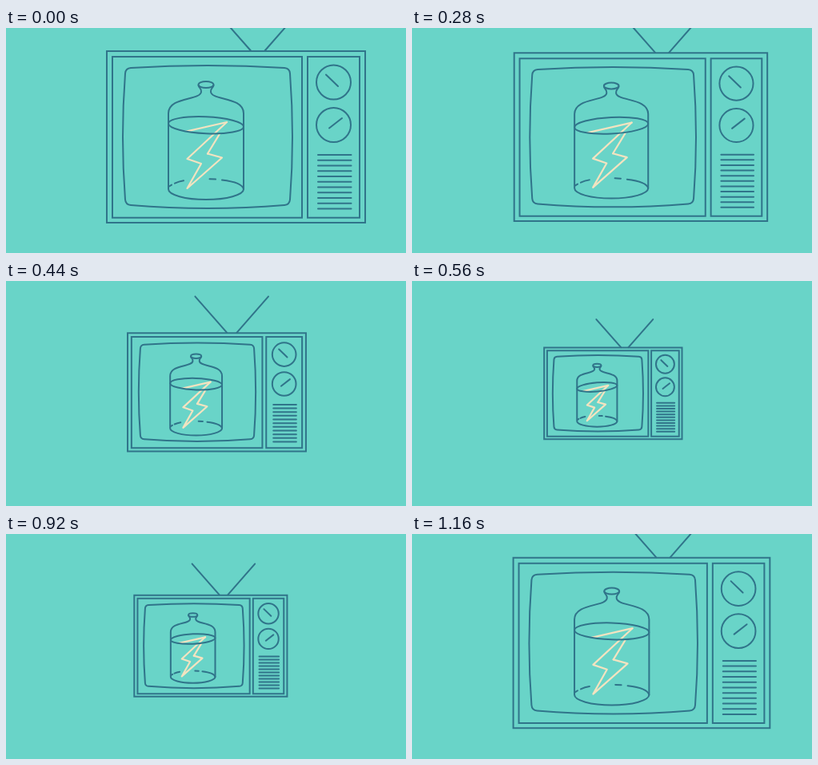
Write an HTML page that moves like this. It is 500 px wide and 282 px high and loops after 1200 ms.

```html
<!DOCTYPE html>
<html lang="en">
<head>
<meta charset="utf-8">
<title>Bottled lightning</title>
<style>
  html, body { margin: 0; width: 100%; height: 100%; overflow: hidden; background: #69d4c8; }
  svg { display: block; width: 100%; height: 100%; }
  #scene * { vector-effect: non-scaling-stroke; }
  #scene { fill: none; stroke: #30748a; stroke-width: 2; stroke-linecap: round; }
  .bolt { stroke: #f3e3c0; stroke-width: 2.2; stroke-linejoin: round; }
</style>
</head>
<body>
<svg viewBox="0 0 500 282">
  <defs>
    <clipPath id="surface"><ellipse class="slosh" cx="250" cy="121.7" rx="47" ry="10.5"/></clipPath>
    <clipPath id="water"><path class="slosh" d="M203 121.7A47 10.5 0 0 0 297 121.7V240H203Z"/></clipPath>
  </defs>
  <g id="scene">
    <!-- cabinet and aerial -->
    <path d="M248.2 -37.3L306 28.5M381 -37.3L323.5 28.5"/>
    <rect x="126" y="29" width="323" height="215"/>
    <rect x="133" y="36" width="237" height="201.7"/>
    <rect x="377" y="36" width="65" height="201.7"/>
    <path d="M156 50Q252 44 348 50Q354.500 50.500 355 57Q361 137 355 215Q354.500 221.500 348 222Q252 230 156 222Q149.500 221.500 149 215Q143 137 149 57Q149.500 50.500 156 50Z"/>
    <!-- controls -->
    <circle cx="409.500" cy="68" r="21.500"/>
    <path d="M400 58.500L415 73"/>
    <circle cx="409.500" cy="121.500" r="21.500"/>
    <path d="M404 125.500L420 113"/>
    <path id="grille"/>
    <!-- lightning -->
    <g class="bolt">
      <path d="M276 118L226.500 164L244 170L226.500 201L270 162.500L252 157.500"/>
      <path clip-path="url(#water)" d="M252 157.500L276 118"/>
      <path clip-path="url(#surface)" d="M276 118L200 135.400"/>
    </g>
    <!-- jar -->
    <ellipse cx="250" cy="71" rx="9.500" ry="4"/>
    <path d="M240.500 72C241.500 75.500 244.500 75.500 244 80C243 91 203 86 203 107V202A47 13 0 0 0 297 202V107C297 86 257 91 256 80C255.500 75.500 258.500 75.500 259.500 72"/>
    <path d="M204 198.500L207 196.600M211 194.700Q216 192.300 222 191.300M254.500 189.200L262 189.600M270 190.600Q295 193.500 297 202"/>
    <ellipse class="slosh" cx="250" cy="121.700" rx="47" ry="10.500"/>
  </g>
</svg>
<script>
  const LOOP = 1200, STEP = 40, FAR = 0.523, PIVOT = [210, 145.7];
  const scene = document.getElementById('scene');
  const liquid = document.querySelectorAll('.slosh');

  let bars = '';
  for (let i = 0; i < 11; i++) bars += `M390 ${159 + i * 6.75}H431.5`;
  document.getElementById('grille').setAttribute('d', bars);

  // symmetric ease, cubic-bezier(a, 0, 1 - a, 1)
  function ease(u, a = 0.53) {
    if (u <= 0) return 0;
    if (u >= 1) return 1;
    let lo = 0, hi = 1;
    for (let i = 0; i < 24; i++) {
      const s = (lo + hi) / 2, r = 1 - s;
      const x = 3 * a * s * r * r + 3 * (1 - a) * s * s * r + s ** 3;
      if (x < u) lo = s; else hi = s;
    }
    return lo * lo * (3 - 2 * lo);
  }

  function draw(t) {
    const away = ease((t - 211) / 400) - ease((t - 802) / 400);
    const k = 1 - (1 - FAR) * (t < STEP ? 0 : away);
    const [px, py] = PIVOT;
    scene.setAttribute('transform', `translate(${px * (1 - k)} ${py * (1 - k)}) scale(${k})`);

    // height difference between the right and left ends of the liquid
    const drop = -2.5 + 6.5 * Math.cos(t / 400 * 2 * Math.PI);
    const slope = drop / 94;
    for (const el of liquid) el.setAttribute('transform', `matrix(1 ${slope} 0 1 0 ${-250 * slope})`);
  }

  const start = performance.now();
  function tick() {
    const t = (performance.now() - start) % LOOP;
    draw(Math.floor(t / STEP) * STEP);
    requestAnimationFrame(tick);
  }
  draw(0);
  requestAnimationFrame(tick);
</script>
</body>
</html>
```
